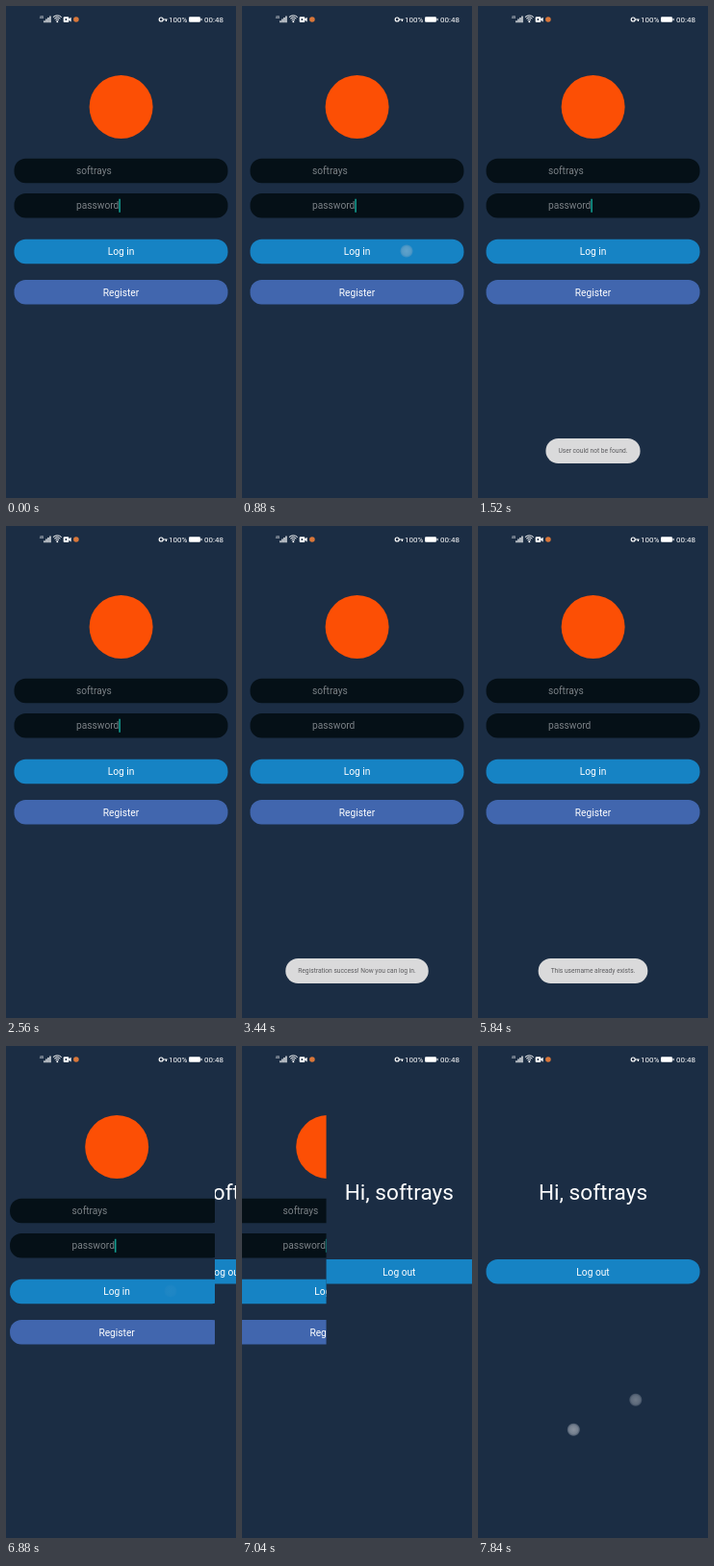
These frames come from a looping animation (239 by 512 pixels, 7920 ms). An HTML page with a canvas:

```html
<!DOCTYPE html>
<html lang="en">
<head>
<meta charset="utf-8">
<title>Login demo</title>
<style>
  html, body { margin: 0; width: 100%; height: 100%; overflow: hidden; background: #1b2d44; }
  canvas { display: block; width: 239px; height: 512px; }
</style>
</head>
<body>
<canvas></canvas>
<script>
const W = 239, H = 512, LOOP = 7920, STEP = 80;
const USER = 'softrays', BG = '#1b2d44', BLUE = '#1683c4';
const canvas = document.querySelector('canvas');
const ctx = canvas.getContext('2d');
const dpr = window.devicePixelRatio || 1;
canvas.width = W * dpr;
canvas.height = H * dpr;

// Times at which the caret turns off, on, off, ...
const CARET = [320, 720, 1120, 1520, 1840, 2240, 2800, 3200, 3440,
  3920, 4240, 4880, 5200, 5520, 5840, 6400];
// Start, end, text
const TOASTS = [
  [1040, 2560, 'User could not be found.'],
  [2880, 4560, 'Registration success! Now you can log in.'],
  [5040, 6480, 'This username already exists.']
];
// Start, end, x, y
const TAPS = [
  [640, 960, 171, 255],
  [2720, 2960, 161, 299],
  [4640, 4960, 161, 299],
  [6640, 6890, 171, 255]
];

const clamp = v => Math.max(0, Math.min(1, v));
const mix = (a, b, p) => a + (b - a) * p;

function box(x, y, w, h, r, color) {
  ctx.fillStyle = color;
  ctx.beginPath();
  ctx.roundRect(x, y, w, h, r);
  ctx.fill();
}

function disc(x, y, r, color) {
  ctx.fillStyle = color;
  ctx.beginPath();
  ctx.arc(x, y, r, 0, 7);
  ctx.fill();
}

function text(str, x, y, size, color = '#fff', align = 'center') {
  ctx.font = size + 'px Roboto, sans-serif';
  ctx.textAlign = align;
  ctx.fillStyle = color;
  ctx.fillText(str, x, y);
}

function bar(y, color, label) {
  box(8.5, y, 222, 25.5, 12, color);
  if (label) text(label, 119.5, y + 16.6, 10.2);
}

function field(y, hint) {
  bar(y, '#051017');
  text(hint, 73, y + 16.5, 10.2, '#7c8287', 'left');
}

function loginPage(t) {
  disc(119.6, 105, 33, '#fc4f05');
  field(158.7, USER);
  field(194.9, 'password');
  if (CARET.filter(c => c <= t).length % 2 === 0) box(117.3, 200.8, 1.6, 14, 0, '#129c90');
  bar(242.7, BLUE, 'Log in');
  bar(285, '#4166ae', 'Register');
}

function homePage() {
  text('Hi, ' + USER, 119.5, 160, 22.6);
  bar(222, BLUE, 'Log out');
}

function clipped(x, w, shift, draw) {
  ctx.save();
  ctx.beginPath();
  ctx.rect(x, 0, w, H);
  ctx.clip();
  ctx.translate(shift, 0);
  draw();
  ctx.restore();
}

function toast([start, end, str], t) {
  const a = Math.min(clamp((t - start) / 160), clamp((end - t) / 160));
  if (!a) return;
  ctx.globalAlpha = a;
  ctx.font = '6.65px Roboto, sans-serif';
  const w = ctx.measureText(str).width + 26;
  box(119.5 - w / 2, 450, w, 26, 13, '#dadadb');
  text(str, 119.5, 465.4, 6.65, '#5d5d60');
  ctx.globalAlpha = 1;
}

function touch(x, y, a) {
  if (a <= 0) return;
  const g = ctx.createRadialGradient(x, y, 0, x, y, 7);
  g.addColorStop(0, 'rgba(205,208,214,.62)');
  g.addColorStop(.65, 'rgba(190,195,204,.55)');
  g.addColorStop(.85, 'rgba(175,182,194,.4)');
  g.addColorStop(1, 'rgba(170,178,190,0)');
  ctx.globalAlpha = a;
  disc(x, y, 7, g);
  ctx.globalAlpha = 1;
}

function statusBar() {
  text('4G', 37, 13, 3.6);
  for (let i = 0; i < 4; i++) box(39.3 + i * 2, 15.2 - i * 1.6, 1.3, 2 + i * 1.6, 0, '#fff');
  ctx.strokeStyle = '#fff';
  ctx.lineWidth = 1;
  for (const r of [2.6, 4.6, 6.6]) {
    ctx.beginPath();
    ctx.arc(53.3, 16.5, r, -2.3, -.84);
    ctx.stroke();
  }
  disc(53.3, 16.3, 1, '#fff');
  box(59.7, 11.3, 5.6, 5.6, 1, '#fff');
  ctx.beginPath();
  ctx.moveTo(64.5, 14);
  ctx.lineTo(67.6, 11.8);
  ctx.lineTo(67.6, 16.4);
  ctx.fill();
  disc(62.4, 14.1, 1, BG);
  disc(72.9, 14, 2.8, '#d9773a');

  ctx.lineWidth = 1.2;
  ctx.beginPath();
  ctx.arc(161.2, 14, 2, 0, 7);
  ctx.moveTo(163.2, 14);
  ctx.lineTo(167.6, 14);
  ctx.moveTo(166.4, 14);
  ctx.lineTo(166.4, 16);
  ctx.stroke();
  text('100%', 169, 17, 8, '#fff', 'left');
  box(190, 11.2, 12, 5.6, 1.2, '#fff');
  box(202.5, 12.7, 1.1, 2.6, .4, '#fff');
  text('00:48', 206, 17, 8, '#fff', 'left');
}

function render(t) {
  ctx.setTransform(dpr, 0, 0, dpr, 0, 0);
  ctx.fillStyle = BG;
  ctx.fillRect(0, 0, W, H);

  // The next page uncovers from the right while the old one drifts left.
  const k = clamp((t - 6800) / 450);
  const p = 1 - (1 - k * k) ** 3;
  const edge = W * (1 - p);
  clipped(0, edge, -48 * p, () => loginPage(t));
  clipped(edge, W - edge, edge / 2, homePage);

  for (const item of TOASTS) toast(item, t);
  for (const [start, end, x, y] of TAPS) {
    touch(x, y, Math.min(clamp((t - start) / 120), clamp((end - t) / 120)));
  }

  // Two fingers spreading apart
  const s = clamp((t - 7560) / 280);
  const a = clamp((t - 7480) / 120);
  touch(mix(124, 99.3, s), mix(372, 399.2, s), a);
  touch(mix(140, 163.8, s), mix(398, 368.2, s), a * .75);

  statusBar();
}

const begin = performance.now();
function tick() {
  const t = (performance.now() - begin) % LOOP;
  render(Math.floor(t / STEP) * STEP);
  requestAnimationFrame(tick);
}
tick();
</script>
</body>
</html>
```
